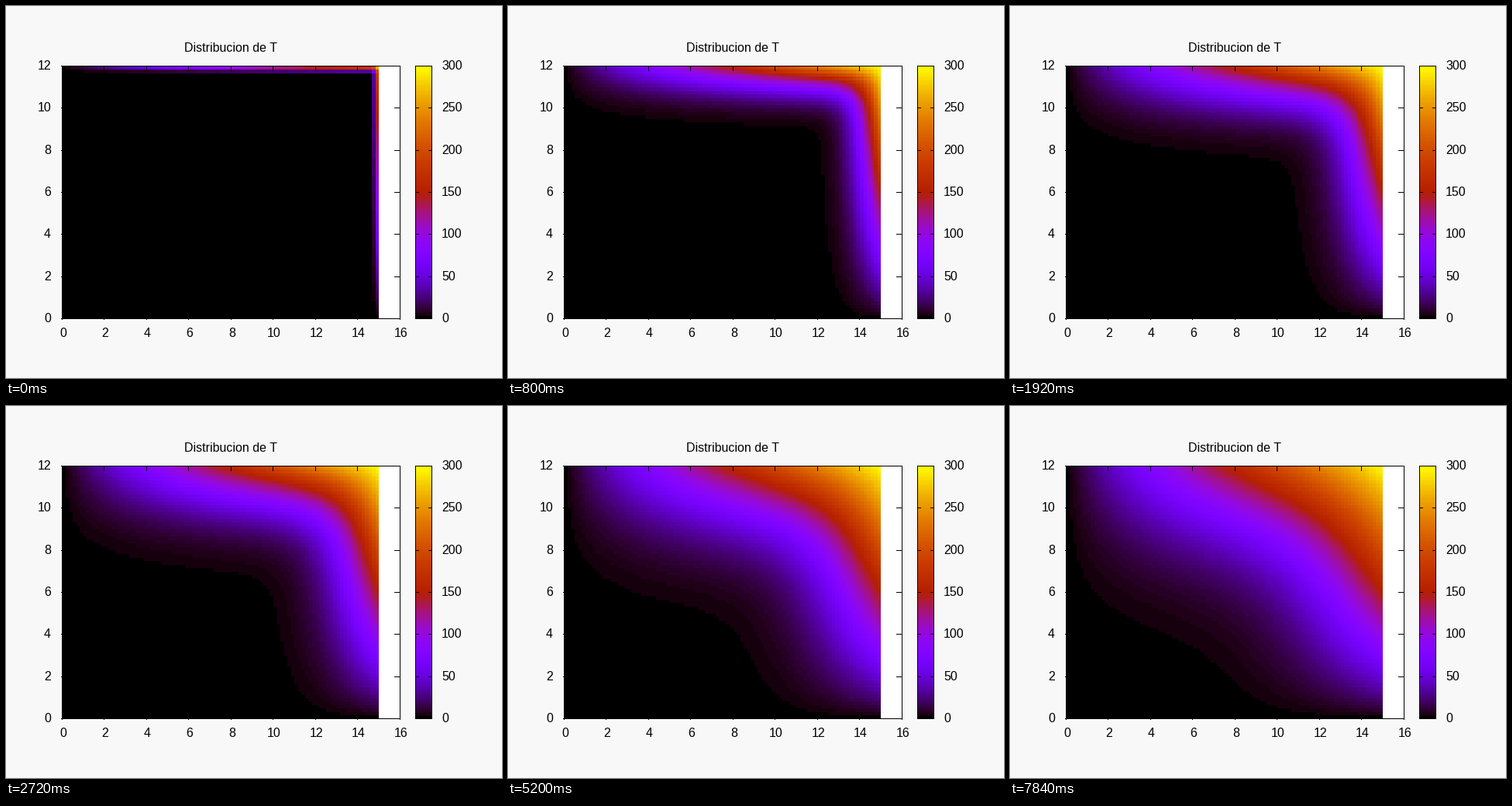
Animation of 640 by 480 pixels, one loop 8000 ms. Source, as a matplotlib script:

```python
import numpy as np
import matplotlib.pyplot as plt
from matplotlib.animation import FuncAnimation
from matplotlib.colors import ListedColormap, Normalize
from matplotlib.patches import Rectangle

W, H, DPI = 640, 480, 100
FRAMES, INTERVAL = 100, 80
NX, NY = 90, 72                 # cells on a 15 x 12 plate
T_MAX = 300
RATE = 0.22                     # D * dt / dx^2
STEPS_PER_FRAME = 10
LEFT, RIGHT, TOP, BOTTOM = 72, 508, 77, 403
BAR_LEFT, BAR_RIGHT = 528, 549


def heat_palette(count=128):
    g = np.linspace(0, 1, count)
    blue = np.clip(np.sin(2 * np.pi * g), 0, 1)
    return ListedColormap(np.column_stack([np.sqrt(g), g ** 3, blue]))


def step(t):
    """One explicit step of the heat equation; the edges stay fixed."""
    mid = t[1:-1, 1:-1]
    around = t[:-2, 1:-1] + t[2:, 1:-1] + t[1:-1, :-2] + t[1:-1, 2:]
    mid += RATE * (around - 4 * mid)


def simulate():
    """Cell temperatures for every frame, row 0 at the top."""
    t = np.zeros((NY + 1, NX + 1))
    t[0] = np.linspace(0, T_MAX, NX + 1)
    t[:, -1] = np.linspace(T_MAX, 0, NY + 1)
    step(t)
    fields = []
    for _ in range(FRAMES):
        fields.append((t[:-1, :-1] + t[1:, :-1] + t[:-1, 1:] + t[1:, 1:]) / 4)
        for _ in range(STEPS_PER_FRAME):
            step(t)
    return fields


fig = plt.figure(figsize=(W / DPI, H / DPI), dpi=DPI, facecolor="#f8f8f8")
ax = fig.add_axes([0, 0, 1, 1])
ax.set_xlim(0, W)
ax.set_ylim(H, 0)
ax.axis("off")


def block(x, y, w, h, color="black", z=3):
    ax.add_patch(Rectangle((x, y), w, h, fc=color, lw=0, antialiased=False, zorder=z))


def outline(x0, y0, x1, y1):
    block(x0, y0, x1 - x0 + 1, 1)
    block(x0, y1, x1 - x0 + 1, 1)
    block(x0, y0, 1, y1 - y0 + 1)
    block(x1, y0, 1, y1 - y0 + 1)


def label(x, y, text, align):
    ax.text(x, y, text, ha=align, va="baseline", family="Liberation Sans",
            fontsize=16 * 72 / DPI, color="black")


fields = simulate()
cmap, norm = heat_palette(), Normalize(0, T_MAX)
style = dict(cmap=cmap, norm=norm, antialiased=False, edgecolors="none", zorder=2)

# Plate
block(LEFT, TOP, RIGHT - LEFT, BOTTOM - TOP, "white", 1)
x_edges = np.floor(LEFT + (RIGHT - LEFT) * 15 / 16 / NX * np.arange(NX + 1)) + 1
y_edges = np.floor(78.35 + 4.526 * np.arange(NY + 1))
heat = ax.pcolormesh(x_edges, y_edges, fields[0], **style)

# Colour scale
levels = (np.arange(cmap.N)[::-1, None] + 0.5) * T_MAX / cmap.N
ax.pcolormesh([BAR_LEFT, BAR_RIGHT], np.linspace(TOP, BOTTOM, cmap.N + 1),
              levels, **style)

outline(LEFT, TOP, RIGHT, BOTTOM)
outline(BAR_LEFT, TOP, BAR_RIGHT, BOTTOM)

for v in range(0, 17, 2):
    x = int(LEFT + (RIGHT - LEFT) * v / 16)
    block(x, TOP, 1, 7)
    block(x, BOTTOM - 5, 1, 7)
    label(x + 1.5, 427, str(v), "center")

for v in range(0, 13, 2):
    y = round(BOTTOM - (BOTTOM - TOP) * v / 12)
    block(LEFT - 1, y, 7, 1)
    block(RIGHT - 7, y, 7, 1)
    label(58, y + 5, str(v), "right")

for v in range(0, 301, 50):
    y = round(BOTTOM - (BOTTOM - TOP) * v / T_MAX)
    block(BAR_LEFT, y, 5, 1)
    block(BAR_RIGHT - 4, y, 5, 1)
    label(562, y + 5, str(v), "left")

label(290, 59, "Distribucion de T", "center")


def update(i):
    heat.set_array(fields[i])
    return heat,


anim = FuncAnimation(fig, update, frames=FRAMES, interval=INTERVAL,
                     repeat=True, repeat_delay=0)
plt.show()
```
